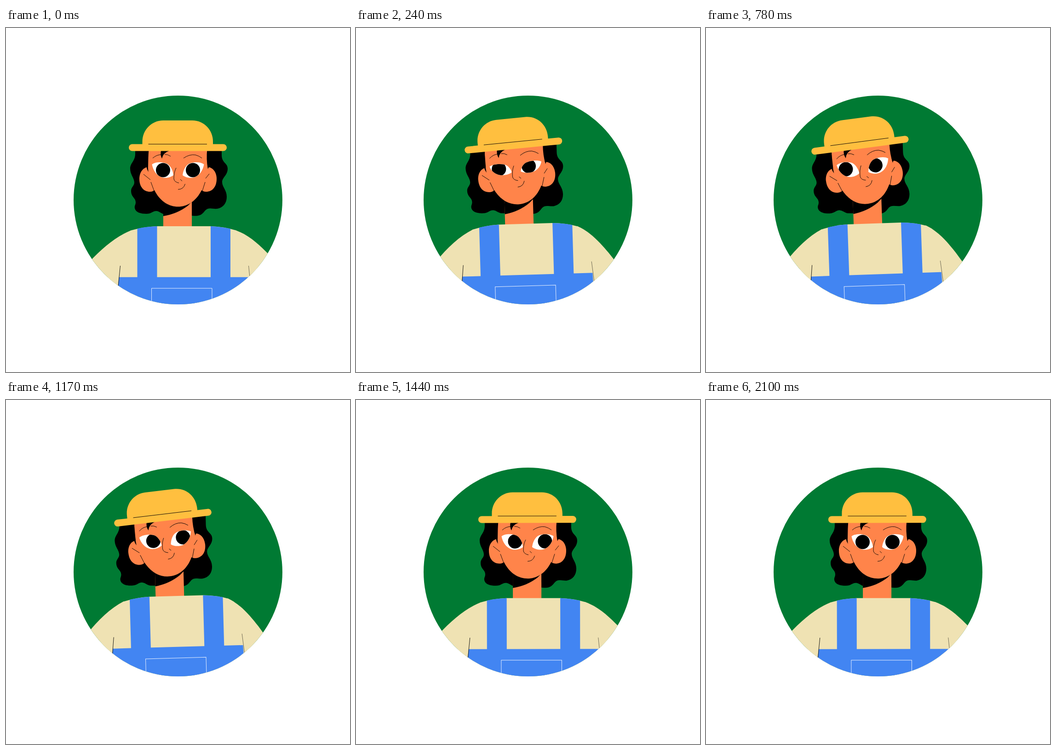
These frames come from a looping animation (748x748 px, 2160 ms). An HTML page:

```html
<!DOCTYPE html>
<html lang="en">
<head>
<meta charset="utf-8">
<title>Gardener looking around</title>
<style>
  html, body { margin: 0; width: 100%; height: 100%; overflow: hidden; background: #fff; }
  svg { display: block; width: 100vw; height: 100vh; }
  .skin { fill: #ff844a; }
  .shirt { fill: #efe2b3; }
  .blue { fill: #4285f2; }
  .hat { fill: #ffbf3f; }
  .line { fill: none; stroke: #000; stroke-width: .9; }
</style>
</head>
<body>
<svg viewBox="0 0 748 748">
  <defs>
    <clipPath id="disc"><circle cx="374" cy="374" r="227"/></clipPath>
    <path id="eye" d="M317.5 296.5C326 290 345 291 353 297C359 302 363 311 364 320C357 326 345 327 338 324.500C327 320 320 310 317.500 296.500Z"/>
    <path id="ear" d="M312 302C297 302 290 315 290 328C290 346 300 356 313 356C318 356 322 354 326 350Z"/>
    <clipPath id="lids">
      <use href="#eye"/>
      <use href="#eye" transform="matrix(-1 0 0 1 748 0)"/>
    </clipPath>
  </defs>

  <circle cx="374" cy="374" r="227" fill="#007a33"/>
  <g clip-path="url(#disc)">
    <g id="body">
      <path id="hair" d="M281 265V275C280 290 270 294 270 306C270 319 279 326 279 336C279 343 272 346 272 354C272 368 282 369 282 379C282 385 279 386 280 392C282 401 293 404 305 404C317 404 319 397 328 398C334 399 337 403 344 405L404 408C425 411 428 402 434 396C441 389 450 394 459 393C472 391 480 381 480 367C480 352 470 346 470 335C470 325 482 320 482 306C482 293 469 294 469 276V253Z"/>

      <path class="skin" d="M342 370H404V440H342Z"/>
      <path d="M342 370V409Q373 404 396 386L404 378V370Z"/>

      <path id="leftArm" class="shirt" d="M150 545C190 495 230 457 272 440L300 480L260 640H150Z"/>
      <path id="rightArm" class="shirt" d="M498 439.500C528 449 552 473 571 492L620 545V640H520L470 480Z"/>
      <path class="shirt" d="M262 447L272 440Q300 432 328 431H445Q475 432 500 440L512 447L545 490L560 640H222V500Z"/>
      <path class="blue" d="M285.500 436.200Q305 432 328.500 431V545H285.500ZM445 431Q468 432 488 436.500V545H445Z"/>
      <path class="blue" d="M245.500 541.800H529L534 640H236Z"/>
      <path class="line" d="M248.500 517L244 562"/>
      <path class="line" d="M527.500 517L533 570" stroke-opacity=".6"/>
      <path d="M316.500 620V566H448V620" fill="none" stroke="#e8f0fe" stroke-width="1"/>

      <g id="head">
        <g class="skin">
          <use href="#ear"/>
          <use href="#ear" transform="matrix(-1 0 0 1 748 0)"/>
          <path d="M310 258L309 302C311 322 316 341 325 357C337 378 355 388.500 374 388.500C393 388.500 411 378 423 357C432 341 437 322 438 302V258Z"/>
        </g>
        <path d="M299 262H311Q307 288 309.500 313Q306 307 305.500 302L299 304ZM449 262H437.500Q435 286 439 307Q440 303 443 301.500L449 304Z"/>
        <path d="M338 264Q334 274 339 284Q341 272 355 267Z"/>
        <path class="line" d="M319 283Q328 275 338 275.500M345 275Q352 274.500 358 279M386 283Q399 274 412 276Q420 278 426 283"/>
        <path class="line" d="M299 318L314 330M315 335L322 354M442 317L434 327M433 335L427 354"/>
        <path class="line" d="M370 304C366 312 365 320 365 328Q366 335 376 337M379 329L383 333M374 351Q386 351 389.500 339"/>

        <g id="eyes" fill="#fff">
          <use href="#eye"/>
          <use href="#eye" transform="matrix(-1 0 0 1 748 0)"/>
        </g>
        <g clip-path="url(#lids)">
          <g id="pupils">
            <circle cx="341.500" cy="309" r="15.500"/>
            <circle cx="406.500" cy="309" r="15.500"/>
          </g>
        </g>

        <g class="hat">
          <path d="M296.500 256V247C296.500 222 316 201 342 201H405C431 201 450 222 450 247V256Z"/>
          <rect x="267" y="252.500" width="213" height="15" rx="7.500"/>
        </g>
        <path class="line" d="M309.500 252.500H437"/>
      </g>
    </g>
  </g>
</svg>

<script>
const LOOP = 2160, STEP = 30, LAST = 2100;

const set = (id, transform) =>
  document.getElementById(id).setAttribute("transform", transform);

// Cubic ease in and out, from 0 at start to 1 at end.
function ease(t, start, end) {
  const u = Math.min(1, Math.max(0, (t - start) / (end - start)));
  return u < 0.5 ? 4 * u ** 3 : 1 - 4 * (1 - u) ** 3;
}

// Smooth rise and fall between start and end.
function pulse(t, start, end) {
  const u = (t - start) / (end - start);
  return u > 0 && u < 1 ? Math.sin(Math.PI * u) ** 2 : 0;
}

function draw(t) {
  const lean = ease(t, 0, 360) * 1.95 - ease(t, 1035, 1395) * 1.87;
  const turn = ease(t, 30, 390) - ease(t, 1080, 1440);
  const gaze = -5.5 * ease(t, 90, 330) + 11 * ease(t, 960, 1170) - 5.5 * ease(t, 1530, 1800);
  const squint = 1 - 0.26 * pulse(t, 60, 420) - 0.22 * pulse(t, 960, 1200);
  const lid = `translate(0 312) scale(1 ${squint}) translate(0 -312)`;

  set("body", `rotate(${-lean} 197 1042)`);
  set("head", `translate(${-1.2 * turn} ${-0.5 * turn}) rotate(${-5.6 * turn} 374 370)`);
  set("hair", `translate(${-14.5 * turn} ${2 * turn})`);
  set("leftArm", `rotate(${-4 * turn} 270 441)`);
  set("rightArm", `rotate(${8.5 * turn} 500 441)`);
  set("pupils", `translate(${gaze} ${-Math.abs(gaze) / 4})`);
  set("eyes", lid);
  set("lids", lid);
}

function tick() {
  const t = performance.now() % LOOP;
  draw(Math.min(LAST, Math.floor(t / STEP) * STEP));
  requestAnimationFrame(tick);
}
tick();
</script>
</body>
</html>
```
